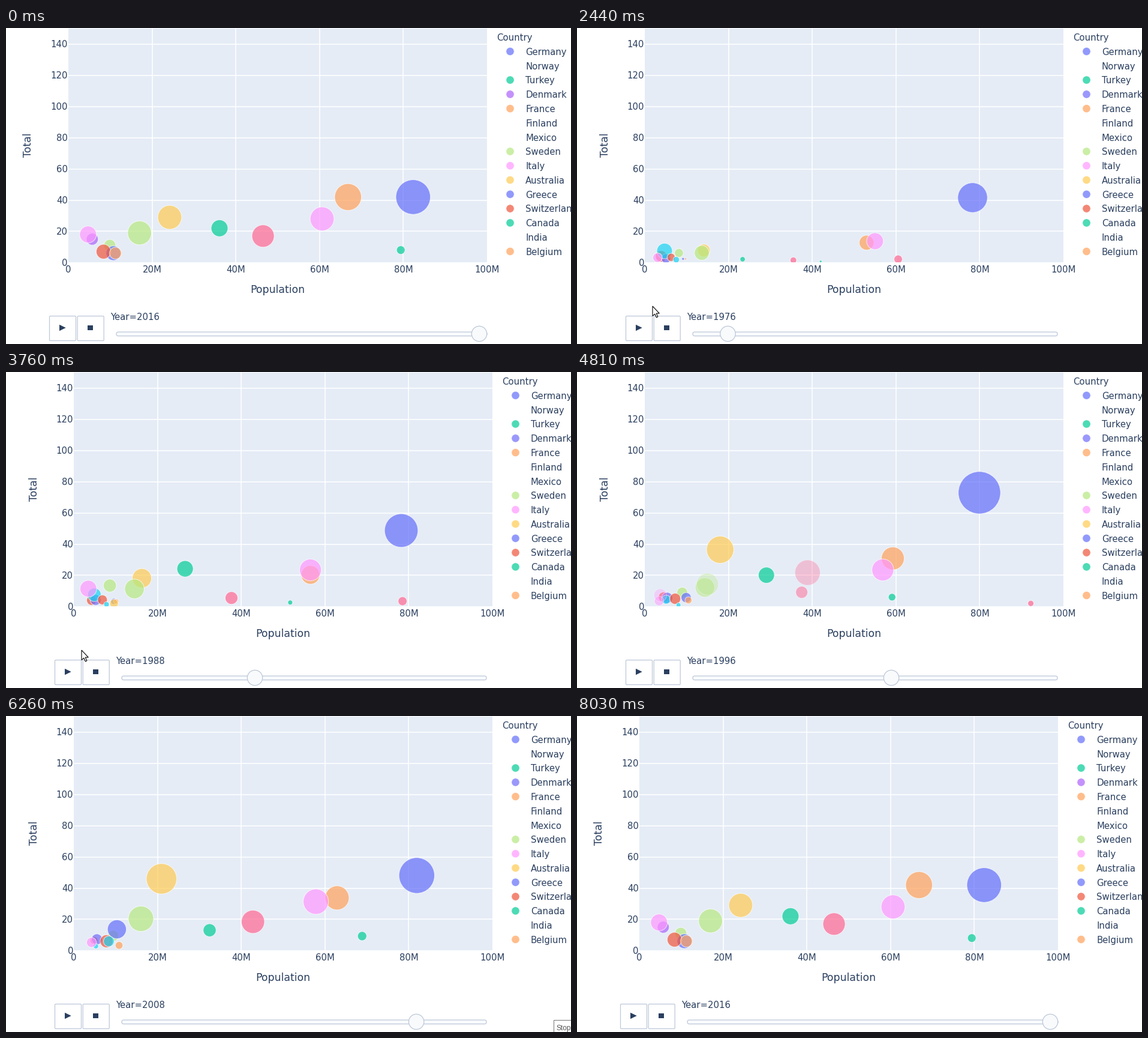
A matplotlib script that plays this animation: 942 by 526 pixels, repeating every 8.1 s.

```python
import numpy as np
import matplotlib.pyplot as plt
from matplotlib.animation import FuncAnimation
from matplotlib.patches import Circle, FancyBboxPatch, Polygon, Rectangle
from matplotlib.transforms import Affine2D

W, H, DPI = 942, 526, 100
LOOP, STEP = 8100, 50
INK, EDGE, PALE = "#2a3f5f", "#bec8d9", "#f8fafc"
PALETTE = ["#636efa", "#ef553b", "#00cc96", "#ab63fa", "#ffa15a",
           "#19d3f3", "#ff6692", "#b6e880", "#ff97ff", "#fecb52"]
LEGEND = ["Germany", "Norway", "Turkey", "Denmark", "France", "Finland",
          "Mexico", "Sweden", "Italy", "Australia", "Greece", "Switzerland",
          "Canada", "India", "Belgium"]
NO_MARKER = {"Norway", "Finland", "Mexico", "India"}

PLAY_START, PLAY_END = 1290, 7970
LEFT, BOTTOM, PX_M, PX_TOTAL = 104, 390.4, 6.98, 2.596
FIRST, LAST = 1972, 2016
FADE_YEAR = 1996

plt.rcParams["font.family"] = "DejaVu Sans"
fig = plt.figure(figsize=(W / DPI, H / DPI), dpi=DPI, facecolor="white")
ax = fig.add_axes([0, 0, 1, 1])
ax.set_xlim(0, W)
ax.set_ylim(H, 0)
ax.axis("off")

# Everything but the pointer and tooltip slides sideways with the layout.
shift = Affine2D()
pos = shift + ax.transData


def px(size):
    return size * 72 / DPI


def label(x, y, text, size=14.9, **kw):
    kw = {"color": INK, "transform": pos, "zorder": 4, **kw}
    return ax.text(x, y, text, fontsize=px(size), **kw)


def style(face, edge=EDGE, width=1.25, z=3):
    return dict(fc=face, ec=edge, lw=px(width), transform=pos, zorder=z)


# Plot area, grid and axis labels
plot = ax.add_patch(Rectangle((LEFT, 1), 698, 389,
                              **style("#e5ecf6", "none", 0, 1)))
for v in range(0, 101, 20):
    x = LEFT + v * PX_M
    if 0 < v < 100:
        ax.plot([x, x], [1, 390], color="white", lw=px(1.6), transform=pos)
    label(x, 407, f"{v}M" if v else "0", ha="center")
for v in range(0, 141, 20):
    y = BOTTOM - v * PX_TOTAL
    if v:
        ax.plot([LEFT, LEFT + 698], [y, y], color="white", lw=px(1.6),
                transform=pos)
    label(103, y + 5.5, str(v), ha="right")
label(453, 441, "Population", 17.3, ha="center")
label(37.5, 195, "Total", 17.3, ha="center", va="center", rotation=90)

# Legend
label(818, 21, "Country")
keys = {}
for i, name in enumerate(LEGEND):
    y = 39 + 23.78 * i
    label(866, y + 5.9, name)
    if name not in NO_MARKER:
        keys[name] = ax.add_patch(Circle(
            (840.5, y), 6.7, alpha=0.7, **style(PALETTE[i % 10], "white", 1)))

# Buttons and slider
for x in (72.5, 119.2):
    ax.add_patch(FancyBboxPatch(
        (x, 479.5), 44, 41, boxstyle="round,pad=0,rounding_size=1.5",
        **style("white")))
ax.add_patch(Polygon([(89, 493.8), (99.7, 499), (89, 504.2)],
                     **style(INK, "none", 0, 4)))
ax.add_patch(Rectangle((136, 495), 8.7, 8.3, **style(INK, "none", 0, 4)))
year_text = label(174, 485.5, "Year=2016")
rail = ax.add_patch(FancyBboxPatch(
    (184, 506), 618, 6.6, boxstyle="round,pad=0,rounding_size=3.2",
    **style(PALE)))
grip = ax.add_patch(Circle((789, 509), 12.7, **style(PALE, z=5)))


class Bubble:
    """A country whose medal total is a straight trend plus tent-shaped peaks.

    pops: evenly spaced populations in millions; trend: first and last total;
    share: first and last part of gold, which sets the radius;
    peaks: (year, height, reach) with a reach of four years by default.
    """

    def __init__(self, color, pops, trend, share, *peaks, fades=False):
        self.pops, self.trend, self.share = pops, trend, share
        self.peaks, self.fades = peaks, fades
        self.disc = self.make_disc(color)
        self.ghost = self.make_disc(color) if fades else None

    @staticmethod
    def make_disc(color):
        disc = ax.add_patch(Circle((0, 0), 1, visible=False,
                                   **style(PALETTE[color % 10], "white", 1)))
        disc.set_clip_path(plot)
        return disc

    def state(self, year):
        def along(values):
            return np.interp(year, np.linspace(FIRST, LAST, len(values)),
                             values)

        total = along(self.trend)
        for peak, height, *reach in self.peaks:
            reach = reach[0] if reach else 4
            total += height * max(0, 1 - abs(year - peak) / reach)
        r = 7.03 * np.sqrt(max(0, total * along(self.share)))
        return np.array([along(self.pops), total, r])

    @staticmethod
    def place(disc, state, alpha=1.0):
        pop, total, r = state
        disc.center = LEFT + pop * PX_M, BOTTOM - total * PX_TOTAL
        disc.radius = r
        disc.set_alpha(0.7 * alpha)
        disc.set_visible(bool(r > 0.6 and alpha > 0.01))

    def update(self, old_year, year, t):
        old, new, alpha = self.state(old_year), self.state(year), 1
        if self.fades:
            self.ghost.set_visible(False)
            if year == FADE_YEAR:
                # The old disc fades out while a new one grows in
                self.place(self.ghost, old, 1 - t)
                old, alpha = self.state(FIRST), min(1, 0.2 + t)
        self.place(self.disc, old + (new - old) * t, alpha)


germany = Bubble(0, (78.4, 78, 81.8, 82.35), (40, 42), (0.29, 0.4),
                 (1972, 26), (1980, 86), (1984, 18), (1992, 41), (1996, 24),
                 (2004, 8))
norway = Bubble(1, (3.8, 5.2), (4, 4), (0.5, 0), (1994, 3, 6), (2004, 3))
turkey = Bubble(2, (38.5, 79.4), (0, 8), (0.125, 0.125), (1992, 2), (1996, 2),
                (2004, 4))
denmark = Bubble(3, (5, 5.7), (2, 9), (0.5, 0.133), (2016, 6))
france = Bubble(4, (51.7, 59.2, 66.8), (10, 42), (0.24, 0.24), (1996, 9))
finland = Bubble(5, (4.65, 5.5), (8, 1), (0.5, 0), (1984, 4))
mexico = Bubble(6, (54, 130), (1, 3), (0.5, 0), (1976, 1), (1984, 4))
sweden = Bubble(7, (8, 9.9), (5, 11), (0.18, 0.18), (1972, 11), (1984, 12),
                (1990, 4, 4))
italy = Bubble(8, (54.4, 56.7, 57, 60.6), (12, 28), (0.286, 0.286), (1972, 6),
               (1984, 14), (1998, 13, 4), (2004, 9))
australia = Bubble(9, (13.3, 17.9, 24.2), (5, 29), (0.3, 0.276), (1972, 12),
                   (1984, 12), (2000, 38, 12))
greece = Bubble(10, (9, 10.75), (2, 6), (0, 0.5), (2002, 13, 8))
switzerland = Bubble(11, (6.1, 8.4), (3, 7), (0.25, 0.43))
canada = Bubble(12, (22.2, 29, 36.1), (0, 22), (0.18, 0.18), (1972, 4),
                (1984, 38), (1992, 8), (1996, 10), (2004, -4))
belgium = Bubble(14, (9.6, 11.25), (2, 6), (0, 0.33), (2004, -2))
austria = Bubble(15, (7.4, 8.7), (2, 0), (0.3, 0.3), (2004, 6.5))
spain = Bubble(16, (34.7, 39.3, 46.5), (0, 17), (0.41, 0.41), (1992, 14),
               (1996, 8), (2004, 7), fades=True)
netherlands = Bubble(17, (13.3, 17), (5, 19), (0.5, 0.42), (1984, 4),
                     (1992, 3), (2000, 12, 8), fades=True)
new_zealand = Bubble(18, (2.9, 4.7), (3, 5), (0.4, 0.22), (1986, 10, 9),
                     (2016, 13, 12), fades=True)
portugal = Bubble(19, (9, 10.9), (0, 0), (0.5, 0.5), (1986, 3, 6))
bubbles = [germany, norway, turkey, denmark, france, finland, mexico, sweden,
           italy, australia, greece, switzerland, canada, belgium, austria,
           spain, netherlands, new_zealand, portugal]

# Pointer and tooltip
ARROW = np.array([(0, 0), (0, 16.5), (3.8, 13), (6.3, 18.8), (8.8, 17.7),
                  (6.3, 12), (11.3, 12)])
HAND = np.array([(-2, 1), (0, 0), (2, 1), (2, 8), (5, 8), (9, 9.5),
                 (11.5, 11), (11.5, 17), (9, 21), (9, 24), (-1, 24), (-1, 22),
                 (-5, 16), (-6, 13), (-4, 12), (-2, 14)])
pointer = ax.add_patch(Polygon(ARROW, closed=True, fc="white", ec="black",
                               lw=px(1.1), zorder=20))
tooltip = [
    ax.add_patch(Rectangle((912.5, 505.5), 60, 40, fc="white", ec="#767676",
                           lw=px(1), zorder=20)),
    label(918, 523.5, "Stop", 12, family="Liberation Sans", color="#575757",
          transform=ax.transData, zorder=21),
]


def point_at(t):
    """Pointer shape and tip position, or None while it is off stage."""
    if 270 <= t < 340:
        return ARROW, (516, 506)
    if 340 <= t < 410:
        return ARROW, (176, 448)
    if 680 <= t < 950:
        f = (t - 680) / 270
        return ARROW, (4 + 88 * f, 478 + 18 * f)
    if 950 <= t < 1800:
        return HAND, (105, 497)
    if 1800 <= t < 4300:
        times = [1800, 2090, 2300]
        return ARROW, (np.interp(t, times, [105, 40, 126]),
                       np.interp(t, times, [497, 432, 463]))
    return None


def ease(t):
    t = min(max(t, 0), 1)
    return 4 * t ** 3 if t < 0.5 else 1 - 4 * (1 - t) ** 3


def progress(t):
    """Games passed since playback began."""
    return np.interp(t, [1415, 1550, 2400, 3750, 4800, 6250, 7760],
                     [0, 0.24, 1.945, 4.55, 6.53, 9.17, 12])


def draw(i):
    t = i * STEP
    playing = PLAY_START <= t < PLAY_END
    u = progress(t)
    step = min(int(u), 11)
    frac = u - step
    before = (step - 1) % 12
    year = FIRST + 4 * step

    shift.clear()
    if playing:
        shift.translate(9, 0)
    rail.set_width(608 if playing else 618)
    tint = "#6f6cfa" if playing else PALETTE[3]
    keys["Denmark"].set_facecolor(tint)
    denmark.disc.set_facecolor(tint)

    for b in bubbles:
        b.update(FIRST + 4 * before, year, frac)

    if playing:
        since = t - PLAY_START if step == 0 else frac * 530
        slot = before + (step - before) * ease(since / 120)
        grip.center = 188 + 54.5 * slot, 509
        year_text.set_text(f"Year={year}")
    else:
        grip.center = 789, 509
        year_text.set_text("Year=2016")

    spot = point_at(t)
    pointer.set_visible(spot is not None)
    if spot:
        shape, tip = spot
        pointer.set_xy(shape + np.array(tip))
    for part in tooltip:
        part.set_visible(6000 <= t < 7500)
    return []


anim = FuncAnimation(fig, draw, frames=LOOP // STEP, interval=STEP,
                     repeat=True, repeat_delay=0, blit=False)
plt.show()
```
